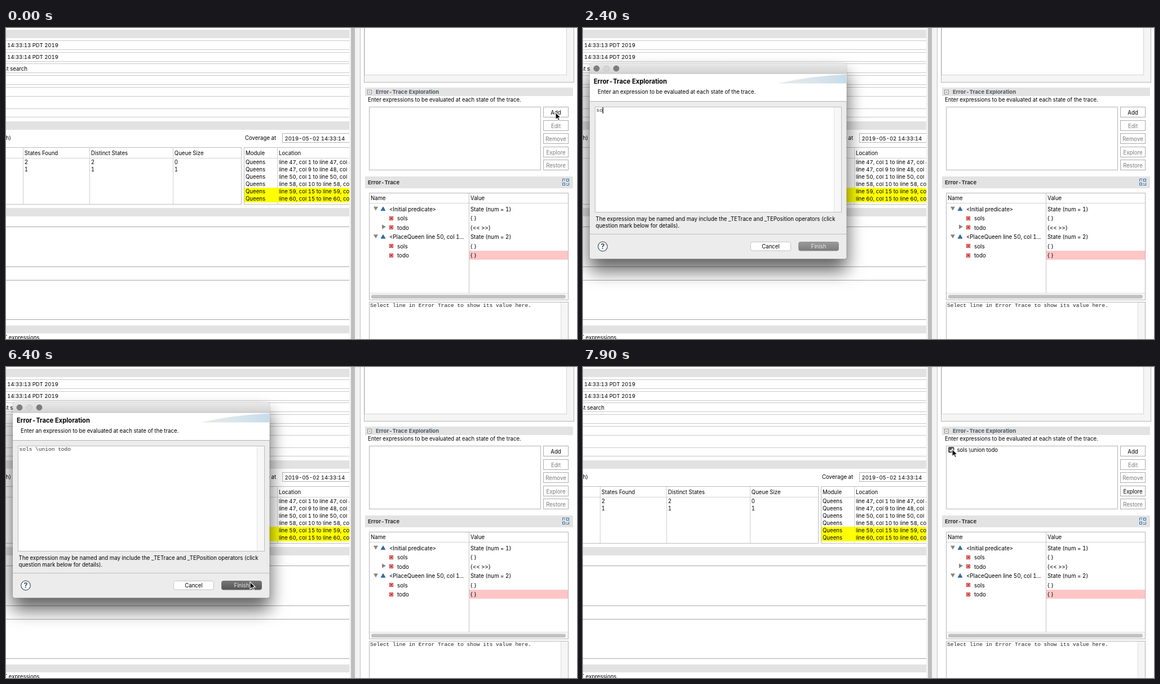
An HTML page that plays this animation: 1013x553 px, repeating every 8000 ms.

```html
<!DOCTYPE html>
<html lang="en">
<head>
<meta charset="utf-8">
<title>Error-Trace Exploration</title>
<style>
html, body { margin: 0; width: 100%; height: 100%; overflow: hidden; background: #fff; }
svg { display: block; width: 1013px; height: 553px; }
text { font-family: Inter, Roboto, sans-serif; font-variant-numeric: tabular-nums; white-space: pre; }
.mono { font-family: "Liberation Mono", "DejaVu Sans Mono", monospace; }
.shadow { filter: drop-shadow(0 20px 16px rgba(0,0,0,.54)) drop-shadow(0 0 1px rgba(0,0,0,.3)); }
</style>
</head>
<body>
<svg id="stage" viewBox="0 0 1013 553" xmlns="http://www.w3.org/2000/svg">
  <defs>
    <clipPath id="leftClip"><rect width="609" height="553"/></clipPath>
    <linearGradient id="bar" x2="0" y2="1"><stop stop-color="#e9e9e9"/><stop offset="1" stop-color="#d3d3d3"/></linearGradient>
    <linearGradient id="ready" x2="0" y2="1"><stop stop-color="#9b9b9b"/><stop offset="1" stop-color="#7b7b7b"/></linearGradient>
    <linearGradient id="down" x2="0" y2="1"><stop stop-color="#777"/><stop offset="1" stop-color="#545454"/></linearGradient>
    <linearGradient id="wave"><stop stop-color="#e8e8e8"/><stop offset=".5" stop-color="#dbe5eb"/><stop offset="1" stop-color="#c6dcea"/></linearGradient>
  </defs>
</svg>
<script>
const NS = "http://www.w3.org/2000/svg";
const stage = document.getElementById("stage");
const LOOP = 8000, STEP = 100;
const SIZE = 9.64, MONO = 9.54, CELL = MONO * 0.6;

function add(parent, tag, attrs) {
  const el = document.createElementNS(NS, tag);
  for (const k in attrs) el.setAttribute(k, attrs[k]);
  parent.appendChild(el);
  return el;
}
const group = (parent, attrs) => add(parent, "g", attrs);
const rect = (p, x, y, w, h, fill, more) => add(p, "rect", { x, y, width: w, height: h, fill, ...more });
const frame = (p, x, y, w, h, stroke, fill = "#fff", more) =>
  rect(p, x + .5, y + .5, w - 1, h - 1, fill, { stroke, ...more });
const hline = (p, y, x1, x2, color) => rect(p, x1, y, x2 - x1, 1, color);
const vline = (p, x, y1, y2, color) => rect(p, x, y1, 1, y2 - y1, color);
const path = (p, d, fill, more) => add(p, "path", { d, fill, ...more });

// cy is the vertical middle of the capitals
function label(p, x, cy, s, more) {
  const el = add(p, "text", { x, y: cy + 3.5, "font-size": SIZE, fill: "#000", ...more });
  el.textContent = s;
  return el;
}
const END = { "text-anchor": "end" }, MID = { "text-anchor": "middle" };
const NUMERIC = { "font-size": 9.54 };
const show = (el, on) => el.setAttribute("visibility", on ? "inherit" : "hidden");

function drawLeft() {
  const g = group(stage, { "clip-path": "url(#leftClip)" });
  for (const [y, h] of [[3, 15], [166, 15], [320, 15], [529, 14]]) rect(g, 0, y, 609, h, "#e2e2e2");
  for (const y of [22, 38, 43, 59, 63, 79, 84, 100, 105, 121, 143, 158]) hline(g, y, 0, 609, "#c9c9c9");
  for (const y of [353, 424, 448, 518]) hline(g, y, 0, 609, "#a6a6a6");
  label(g, 2, 30.5, "14:33:13 PDT 2019", NUMERIC);
  label(g, 2, 51.5, "14:33:14 PDT 2019", NUMERIC);
  label(g, 38, 72, "first search", END);
  label(g, 9, 195.5, "h)", END);
  label(g, 62, 550, "T expressions.", END);

  label(g, 424, 195.5, "Coverage at");
  frame(g, 490, 187, 130, 17, "#b5b5b5");
  label(g, 494.5, 196, "2019-05-02 14:33:14", NUMERIC);

  frame(g, -5, 212, 423, 102, "#bcbcbc");
  hline(g, 231, 0, 417, "#d2d2d2");
  const columns = [[30, "States Found", "2", "1"], [148, "Distinct States", "2", "1"], [296, "Queue Size", "0", "1"]];
  for (const [x, head, a, b] of columns) {
    vline(g, x, 213, 313, "#cfcfcf");
    label(g, x + 2.8, 222, head);
    label(g, x + 2.8, 238.5, a);
    label(g, x + 2.8, 251.5, b);
  }

  frame(g, 422, 212, 200, 102, "#bcbcbc");
  hline(g, 231, 423, 609, "#d2d2d2");
  vline(g, 481, 213, 313, "#cfcfcf");
  rect(g, 423, 284, 186, 26, "#ffff00");
  label(g, 425, 222, "Module");
  label(g, 484, 222, "Location");
  const places = [
    "line 47, col 1 to line 47, col 4", "line 47, col 9 to line 48, col 21",
    "line 50, col 1 to line 50, col 10", "line 58, col 10 to line 58, col 25",
    "line 59, col 15 to line 59, col 30", "line 60, col 15 to line 60, col 30"];
  places.forEach((s, i) => {
    label(g, 425, 238.5 + 13 * i, "Queens");
    label(g, 484, 238.5 + 13 * i, s, NUMERIC);
  });
}

function drawTree(g) {
  frame(g, 644, 293, 354, 191, "#b4b4b4");
  hline(g, 311, 645, 997, "#d2d2d2");
  rect(g, 822, 396, 175, 16, "#ffc6c6");
  vline(g, 821, 294, 471, "#c4c4c4");
  label(g, 647, 302.5, "Name");
  label(g, 824, 302.5, "Value");
  const rows = [
    ["<Initial predicate>", "State (num = 1)", true], ["sols", "{ }"], ["todo", "{<< >>}"],
    ["<PlaceQueen line 50, col 1...", "State (num = 2)", true], ["sols", "{ }"], ["todo", "{ }"]];
  rows.forEach(([name, value, state], i) => {
    const y = 322.3 + 16.45 * i, big = { "font-size": 9.8 };
    label(g, state ? 680 : 694, y, name, big);
    label(g, 824, y, value, big);
    if (state) {
      path(g, `M652 ${y - 4.5}h8l-4 7z`, "#858585");
      path(g, `M669 ${y - 4.5}l4 7h-8z`, "#2f6cb0", { stroke: "#1d4c86", "stroke-width": .6 });
    } else {
      frame(g, 680, Math.round(y) - 4, 7, 7, "#c22a2a", "#f5b5b5");
      rect(g, 682, Math.round(y) - 2, 3, 3, "#d02020");
    }
  });
  path(g, "M667 349.5v8l7-4z", "#858585");
  rect(g, 645, 471, 352, 12, "#f7f7f7");
  hline(g, 471, 645, 997, "#dedede");
  rect(g, 648, 474.5, 345, 6.5, "#c1c1c1", { rx: 3.2 });
}

function drawRight() {
  const g = group(stage);
  rect(g, 609, 0, 19, 553, "#f3f3f3");
  rect(g, 612, 0, 7, 553, "#bdbdbd");
  vline(g, 628, 0, 553, "#c4c4c4");

  frame(g, 635, -5, 373, 102, "#b5b5b5", "#f5f5f5");
  frame(g, 636, -5, 359, 89, "#d5d5d5");

  rect(g, 637, 106, 369, 15, "#e3e3e3");
  frame(g, 641, 110, 8, 8, "#8a8a8a");
  hline(g, 113.5, 643, 647, "#555");
  label(g, 656, 113, "Error-Trace Exploration", { "font-weight": 700, fill: "#4d5766" });
  label(g, 642, 127.5, "Enter expressions to be evaluated at each state of the trace.");
  frame(g, 644, 140, 305, 113, "#b4b4b4");

  const buttons = {};
  ["Add", "Edit", "Remove", "Explore", "Restore"].forEach((s, i) => {
    const y = 140 + Math.round(23.5 * i);
    const box = frame(g, 953, y, 45, 19, "#ababab");
    const text = label(g, 975.5, y + 10, s, { ...MID, fill: i ? "#7a7a7a" : "#000" });
    buttons[s] = { box, text };
  });

  const item = group(g);
  const check = rect(item, 648, 142, 10.5, 10.5, "#858585", { rx: 2 });
  path(item, "M650.5 147.5l2 2.3 3.6-5.2", "none", { stroke: "#fff", "stroke-width": 1.4 });
  label(item, 663.5, 147.5, "sols \\union todo");

  rect(g, 637, 264, 369, 21, "#e3e3e3");
  label(g, 642, 274, "Error-Trace", { "font-weight": 700, fill: "#333" });
  const blue = "#2f6d9c";
  frame(g, 994, 268, 5, 5, blue, "#d6e8f4");
  frame(g, 987, 275, 5, 5, blue, "#d6e8f4");
  path(g, "M987.5 273v-4.500h5M998.500 275v4.500h-5M990 271.500h2M994 276.500h2", "none", { stroke: blue });

  drawTree(g);
  frame(g, 644, 487, 354, 80, "#b4b4b4");
  rect(g, 985, 488, 12, 65, "#f5f5f5");
  vline(g, 984, 488, 553, "#dedede");
  label(g, 646, 493, "Select line in Error Trace to show its value here.",
    { class: "mono", "font-size": MONO, y: 496, fill: "#222" });
  return { buttons, item, check };
}

function drawDialog() {
  const g = group(stage);
  rect(g, 12, 63, 455.5, 347.5, "#ececec", { rx: 4, class: "shadow" });
  path(g, "M12 81v-14a4 4 0 0 1 4-4h447.5a4 4 0 0 1 4 4v14z", "url(#bar)");
  for (const [x, c, s] of [[24, "#7d7d7d", "#6c6c6c"], [41.5, "#d5d5d5", "#bfbfbf"], [59, "#7d7d7d", "#6c6c6c"]])
    add(g, "circle", { cx: x, cy: 72, r: 5, fill: c, stroke: s, "stroke-width": .7 });
  rect(g, 12, 81, 455.5, 49, "#fff");
  hline(g, 80.5, 12, 467.5, "#bdbdbd");
  path(g, "M346 98.5Q405 85 467.5 82.5V98.5z", "url(#wave)");
  hline(g, 130, 12, 467.5, "#b2b2b2");
  label(g, 19, 95, "Error-Trace Exploration", { "font-weight": 700, "font-size": 11.15, y: 98.8 });
  label(g, 26, 113.5, "Enter an expression to be evaluated at each state of the trace.");
  frame(g, 21, 140, 438, 188, "#bcbcbc");
  rect(g, 446, 141, 12, 186, "#f7f7f7");
  vline(g, 445, 141, 327, "#e2e2e2");
  label(g, 22.5, 339, "The expression may be named and may include the _TETrace and _TEPosition operators (click");
  label(g, 22.5, 351, "question mark below for details).");
  hline(g, 366, 12, 467.5, "#bdbdbd");
  add(g, "circle", { cx: 35, cy: 388.5, r: 8.3, fill: "#fafafa", stroke: "#4c5660", "stroke-width": 1.2 });
  label(g, 35, 388.5, "?", { ...MID, "font-size": 12.5, y: 393, "font-weight": 700, fill: "#35557a" });
  frame(g, 297, 380, 72, 16.5, "#c4c4c4", "#fff", { rx: 3 });
  label(g, 333, 388.3, "Cancel", MID);
  const finish = frame(g, 382, 380, 72, 16.5, "#cfcfcf", "#f2f2f2", { rx: 3 });
  const finishText = label(g, 418, 388.3, "Finish", MID);
  const typed = label(g, 23.5, 146, "", { class: "mono", "font-size": MONO, y: 149, fill: "#333" });
  const caret = rect(g, 23, 141, 1.2, 11, "#000");
  return { g, finish, finishText, typed, caret };
}

function drawPointers() {
  const g = group(stage);
  const arrow = path(g, "M0 0V12.8L3 10.2 5 14.8 7.2 13.8 5.2 9.3H9.2z", "#000",
    { stroke: "#fff", "stroke-width": 1.1 });
  const beam = path(g, "M-3 -6.5Q0 -6.5 0 -4.5Q0 -6.5 3 -6.5M0 -5V5M-3 6.5Q0 6.5 0 4.5Q0 6.5 3 6.5M-1.5 2H1.5",
    "none", { stroke: "#222", "stroke-width": 1.1 });
  const resize = path(g, "M-7.5 0l4.5 -4v2.7h6v-2.7l4.5 4-4.5 4v-2.7h-6v2.7z", "#000",
    { stroke: "#fff", "stroke-width": .9 });
  return { g, arrow, beam, resize };
}

drawLeft();
const right = drawRight(), dialog = drawDialog(), pointer = drawPointers();

const OPEN = 400, CLOSE = 6500, TYPE = 2300, MOVE = 4500;
const PHRASE = "sols \\union todo";
const KEYS = [23, 24, 25, 26, 28, 30, 32, 33, 35, 36, 37, 38, 40, 41, 43, 44];
const TRAIL = [
  [0, 975, 150], [400, 975, 150], [1200, 363, 166], [4500, 363, 166], [5100, 468, 292],
  [6000, 433, 382], [6500, 433, 382], [6900, 709, 247], [7000, 788, 169],
  [7100, 788, 169], [7700, 655, 146], [LOOP, 655, 146]];

function pointerAt(t) {
  const i = TRAIL.findIndex(p => p[0] > t);
  const [t0, x0, y0] = TRAIL[i - 1], [t1, x1, y1] = TRAIL[i];
  const u = (t - t0) / (t1 - t0), e = u * u * (3 - 2 * u);
  return [x0 + (x1 - x0) * e, y0 + (y1 - y0) * e];
}

function render(t) {
  const open = t >= OPEN && t < CLOSE, done = t >= CLOSE;
  show(dialog.g, open);
  show(right.item, done);
  right.buttons.Explore.text.setAttribute("fill", done ? "#000" : "#7a7a7a");
  right.buttons.Add.box.setAttribute("fill", t >= 100 && t < 200 ? "#d0d0d0" : "#fff");
  right.check.setAttribute("fill", t >= 7800 ? "#575757" : "#858585");

  const count = KEYS.filter(k => k * 100 <= t).length;
  dialog.typed.textContent = PHRASE.slice(0, count);
  dialog.caret.setAttribute("x", 23.3 + count * CELL);
  const typing = t >= TYPE && t < MOVE;
  show(dialog.caret, open && (typing || t % 1000 >= 500));
  const pressed = t >= 6300;
  dialog.finish.setAttribute("fill", !count ? "#f2f2f2" : pressed ? "url(#down)" : "url(#ready)");
  dialog.finish.setAttribute("stroke", !count ? "#cfcfcf" : pressed ? "#707070" : "#929292");
  dialog.finishText.setAttribute("fill", count ? "#ececec" : "#b6b6b6");

  const [x, y] = pointerAt(t);
  const inText = open && x > 22 && x < 458 && y > 141 && y < 328;
  const onEdge = open && Math.abs(x - 467.5) < 3;
  pointer.g.setAttribute("transform", `translate(${x} ${y})`);
  show(pointer.g, !typing);
  show(pointer.beam, inText);
  show(pointer.resize, onEdge);
  show(pointer.arrow, !inText && !onEdge);
}

const start = performance.now();
function tick() {
  const t = (performance.now() - start) % LOOP;
  render(Math.floor(t / STEP) * STEP);
  requestAnimationFrame(tick);
}
tick();
</script>
</body>
</html>
```
